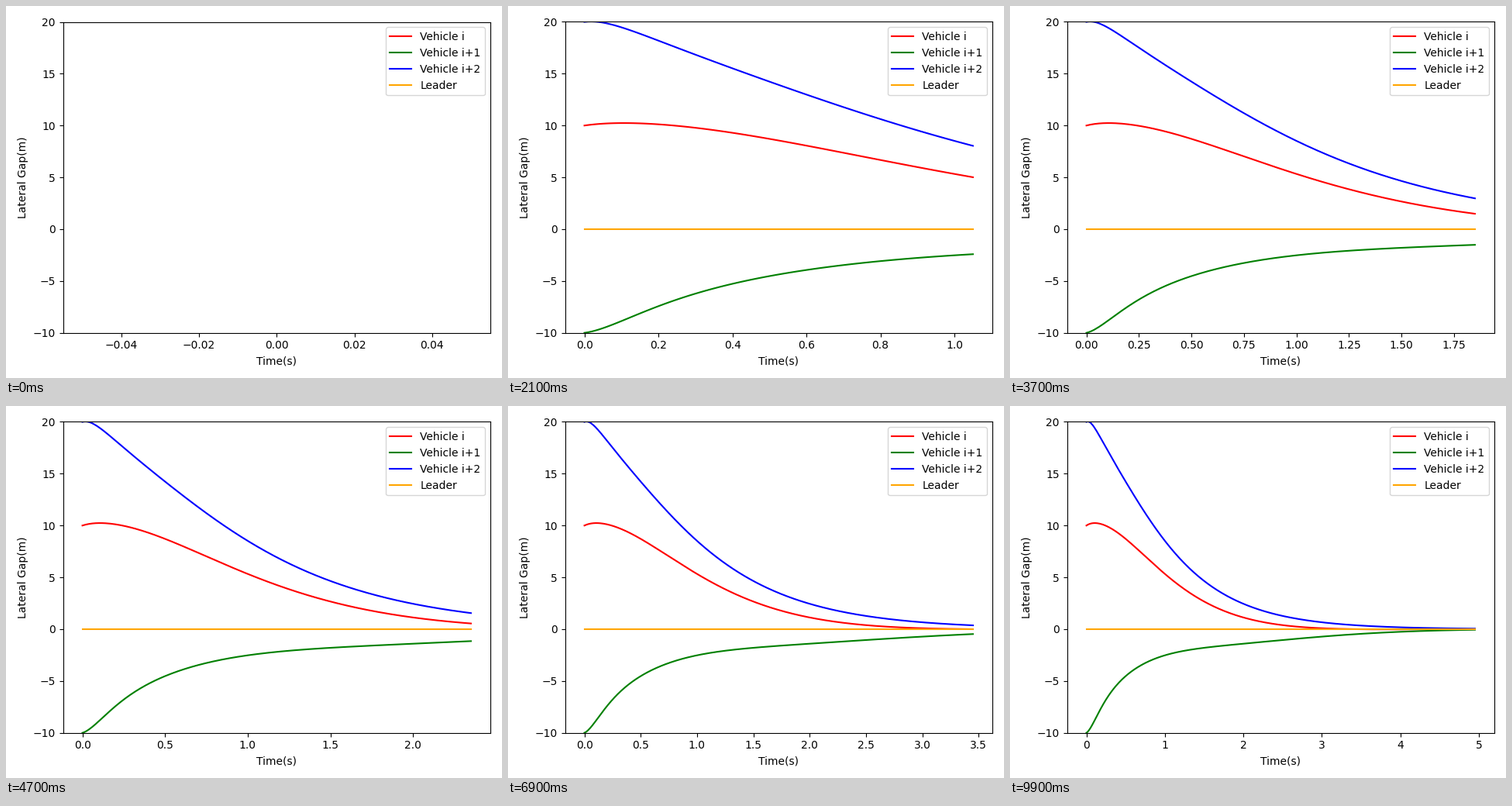
Recreate the animation shown at these times as a matplotlib script. Size 640 by 480 pixels, loop 10 s.

```python
import numpy as np
import matplotlib.pyplot as plt
from matplotlib.animation import FuncAnimation

FRAMES, INTERVAL = 100, 100
DT, STEPS = 0.01, 5        # sample spacing in seconds, samples per frame
DECAY = 1.3                # rate of the slow approach to zero
TRANSIENTS = (3, 6, 12)    # rates of the quick initial response

# Each gap is a sum of damped modes passing through a few key points
KEY_TIMES = np.array([0, .05, .15, .4, 1, 2, 3.45])
VEHICLES = [
    ("Vehicle i", "red", [10, 10.18, 10.21, 9.3, 5.33, 1.13, 0]),
    ("Vehicle i+1", "green", [-10, -9.55, -8.13, -5.27, -2.52, -1.4, -.47]),
    ("Vehicle i+2", "blue", [20, 19.93, 18.86, 15.52, 8.52, 2.45, .37]),
    ("Leader", "orange", np.zeros(len(KEY_TIMES))),
]


def modes(t):
    slow = [t**p * np.exp(-DECAY * t) for p in range(4)]
    fast = [np.exp(-rate * t) for rate in TRANSIENTS]
    return np.column_stack(slow + fast)


def response(key_gaps, t):
    return modes(t) @ np.linalg.solve(modes(KEY_TIMES), key_gaps)


time = np.arange(FRAMES * STEPS) * DT
fig, ax = plt.subplots(figsize=(6.4, 4.8), dpi=100)
ax.set(xlabel="Time(s)", ylabel="Lateral Gap(m)", ylim=(-10, 20))

tracks = []
for label, color, key_gaps in VEHICLES:
    line, = ax.plot([], [], color=color, label=label)
    tracks.append((line, response(key_gaps, time)))
ax.legend(loc="upper right")


def update(i):
    shown = i * STEPS + 1
    for line, gap in tracks:
        line.set_data(time[:shown], gap[:shown])
    ax.relim()
    ax.autoscale_view(scaley=False)
    fig.tight_layout()
    return [line for line, _ in tracks]


def init():
    fig.subplots_adjust(left=0.125, right=0.9, bottom=0.11, top=0.88)
    return update(0)


anim = FuncAnimation(fig, update, frames=FRAMES, init_func=init,
                     interval=INTERVAL, repeat=True, repeat_delay=0)
plt.show()
```
